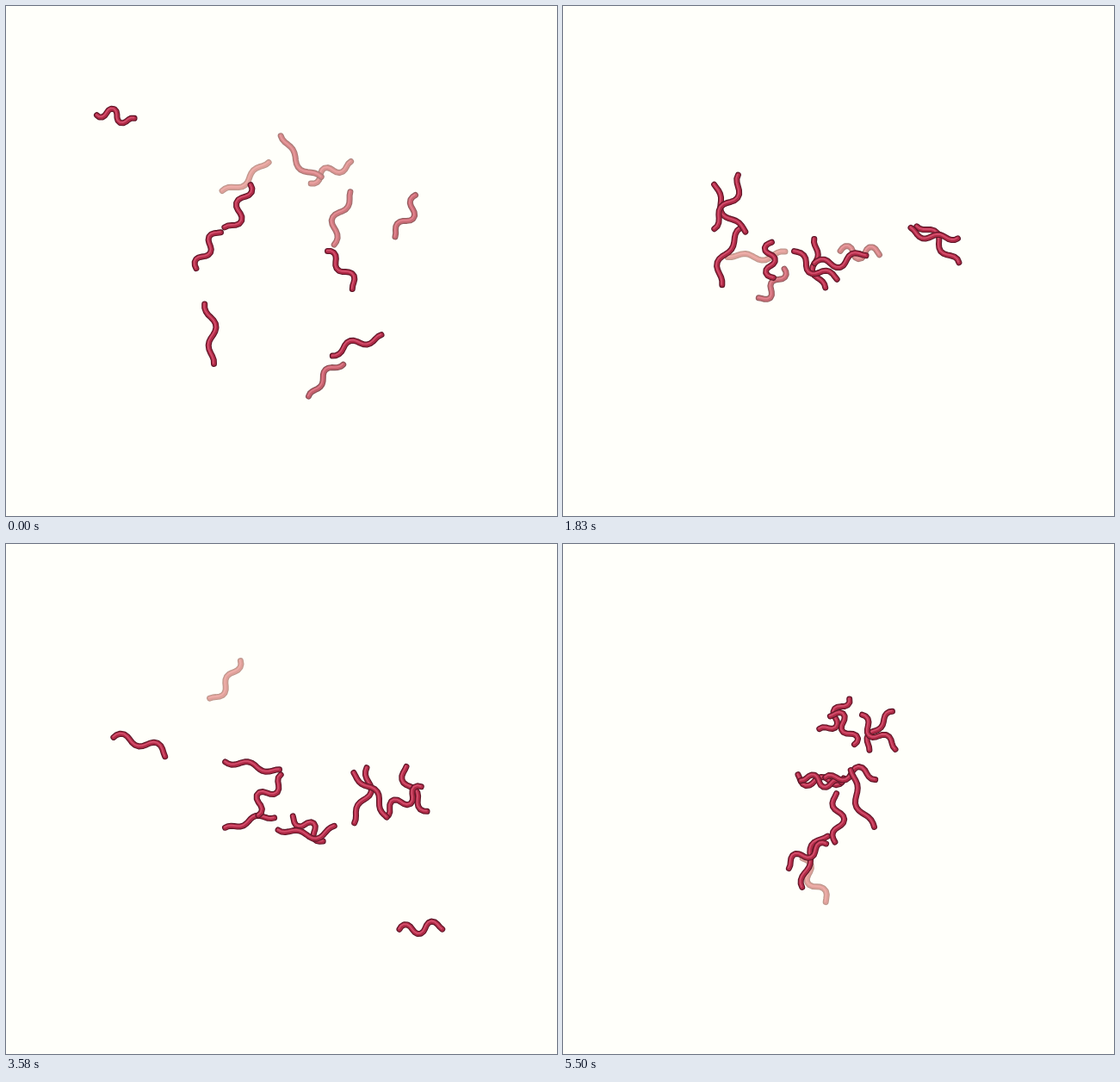
Animation, 640 px wide and 592 px high, one loop 5.58 s. Source, as an HTML page:

```html
<!DOCTYPE html>
<html lang="en">
<head>
<meta charset="utf-8">
<title>Drifting chains</title>
<style>
html, body { margin: 0; width: 100%; height: 100%; overflow: hidden; background: #fffffa; }
svg { display: block; width: 640px; height: 592px; }
polyline { fill: none; stroke-linecap: round; stroke-linejoin: round; }
</style>
</head>
<body>
<svg id="stage" viewBox="0 0 640 592"></svg>
<script>
const LOOP = 5580, COUNT = 12, LINKS = 18, TAU = Math.PI * 2;

// Each pose: tick, how many spots are far off (the last ones), then the spots as x, y.
// Where there are fewer spots than chains, the first spots hold two.
const poses = [
  [0, 6, 127, 128, 272, 235, 233, 282, 238, 380, 391, 305, 407, 393,
    370, 432, 465, 244, 388, 246, 340, 178, 377, 193, 279, 200],
  [10, 3, 262, 322, 352, 268, 290, 280, 320, 177, 402, 304, 252, 325,
    298, 409, 265, 418, 390, 294],
  [22, 3, 295, 300, 192, 228, 430, 267, 240, 295, 322, 295, 190, 290,
    245, 325, 345, 285, 225, 290],
  [34, 2, 455, 243, 283, 175, 335, 213, 192, 170, 228, 201, 237, 243,
    303, 234, 325, 433, 279, 315],
  [43, 1, 425, 290, 350, 335, 462, 297, 283, 322, 286, 258, 304, 291,
    482, 445, 157, 231, 257, 160],
  [50, 8, 450, 435, 290, 190, 235, 232, 280, 235, 208, 207, 270, 163,
    312, 165, 340, 180, 358, 195],
  [66, 1, 365, 215, 282, 360, 300, 275, 335, 268, 317, 200, 328, 212,
    345, 297, 318, 318, 292, 390]
].map(readPose);

function rand(n) {
  const v = Math.sin(n * 127.1 + 11.7) * 43758.5453;
  return v - Math.floor(v);
}

function readPose([tick, far, ...xy], n) {
  const spots = xy.length / 2;
  const slots = Array.from({ length: COUNT }, (_, i) => {
    const s = i % spots, fromEnd = spots - 1 - s, seed = n * 100 + i * 7;
    const nudge = i < spots ? 0 : 24;
    return {
      x: xy[s * 2] + nudge * (rand(seed) - 0.5),
      y: xy[s * 2 + 1] + nudge * (rand(seed + 1) - 0.5),
      near: fromEnd < far ? 0.4 + 0.4 * fromEnd / far : 1,
      angle: rand(seed + 2) * TAU,
      length: 60 + rand(seed + 3) * 18,
      bend: 0.5 + rand(seed + 4) * 0.7,
      curl: (rand(seed + 5) - 0.5) * 2.2,
      phase: rand(seed + 6) * TAU
    };
  });
  return { tick, slots };
}

// Every chain takes the nearest slot still free in the next pose
for (let n = 1; n < poses.length; n++) {
  const free = poses[n].slots;
  poses[n].slots = poses[n - 1].slots.map(a => {
    const gap = b => Math.hypot(a.x - b.x, a.y - b.y);
    const best = free.reduce((p, q) => gap(q) < gap(p) ? q : p);
    return free.splice(free.indexOf(best), 1)[0];
  });
}

const mix = (a, b, u) => a + (b - a) * u;

function blend(a, b, u, seed) {
  const c = {};
  for (const key in a) c[key] = mix(a[key], b[key], u);
  const reach = Math.sin(Math.PI * u) * 85 * rand(seed);
  const heading = rand(seed + 1) * TAU + u * 3;
  c.x += reach * Math.cos(heading);
  c.y += reach * Math.sin(heading);
  return c;
}

// A wavy chain of equal links, centred on its spot
function trace(c) {
  const step = c.length / (LINKS - 1), pts = [[0, 0]];
  for (let j = 1; j < LINKS; j++) {
    const s = j / LINKS;
    const dir = c.angle + c.curl * (s - 0.5) + c.bend * Math.sin(c.phase + s * TAU * 1.7);
    const [x, y] = pts[j - 1];
    pts.push([x + step * Math.cos(dir), y + step * Math.sin(dir)]);
  }
  const mid = i => pts.reduce((sum, p) => sum + p[i], 0) / LINKS;
  const dx = c.x - mid(0), dy = c.y - mid(1);
  return pts.map(([x, y]) => [x + dx, y + dy]);
}

// Far chains fade into a warm haze
function haze(rgb, near) {
  const fog = [255, 238, 210];
  return `rgb(${rgb.map((v, i) => Math.round(mix(fog[i], v, near)))})`;
}

const layers = [
  { width: 7, rgb: [92, 22, 38], shift: 0 },
  { width: 4.8, rgb: [174, 42, 70], shift: 0 },
  { width: 1.8, rgb: [212, 78, 108], shift: -0.6 }
];
const stage = document.getElementById("stage");
const lines = Array.from({ length: COUNT * layers.length }, () =>
  stage.appendChild(document.createElementNS("http://www.w3.org/2000/svg", "polyline")));

const startOf = k => Math.round(k * 100 / 12) * 10;

// Twelve ticks a second; every sixth tick repeats the one before
function tickAt(t) {
  let k = Math.round(t * 0.012);
  if (startOf(k) > t) k--;
  if (k % 6 === 3) k--;
  return k;
}

function draw(tick) {
  const n = poses.findIndex((p, i) => i && tick <= p.tick);
  const from = poses[n - 1], to = poses[n];
  const u = (tick - from.tick) / (to.tick - from.tick);
  const chains = from.slots
    .map((a, i) => blend(a, to.slots[i], u, n * 50 + i * 3))
    .sort((a, b) => a.near - b.near);
  chains.forEach((c, i) => {
    const pts = trace(c);
    layers.forEach(({ width, rgb, shift }, j) => {
      const line = lines[i * layers.length + j];
      line.setAttribute("points", pts.map(p => p.map(v => (v + shift).toFixed(1))).join(" "));
      line.setAttribute("stroke", haze(rgb, c.near));
      line.setAttribute("stroke-width", width);
    });
  });
}

let shown = -1;
function run() {
  const tick = tickAt(performance.now() % LOOP);
  if (tick !== shown) draw(shown = tick);
  requestAnimationFrame(run);
}
run();
</script>
</body>
</html>
```
